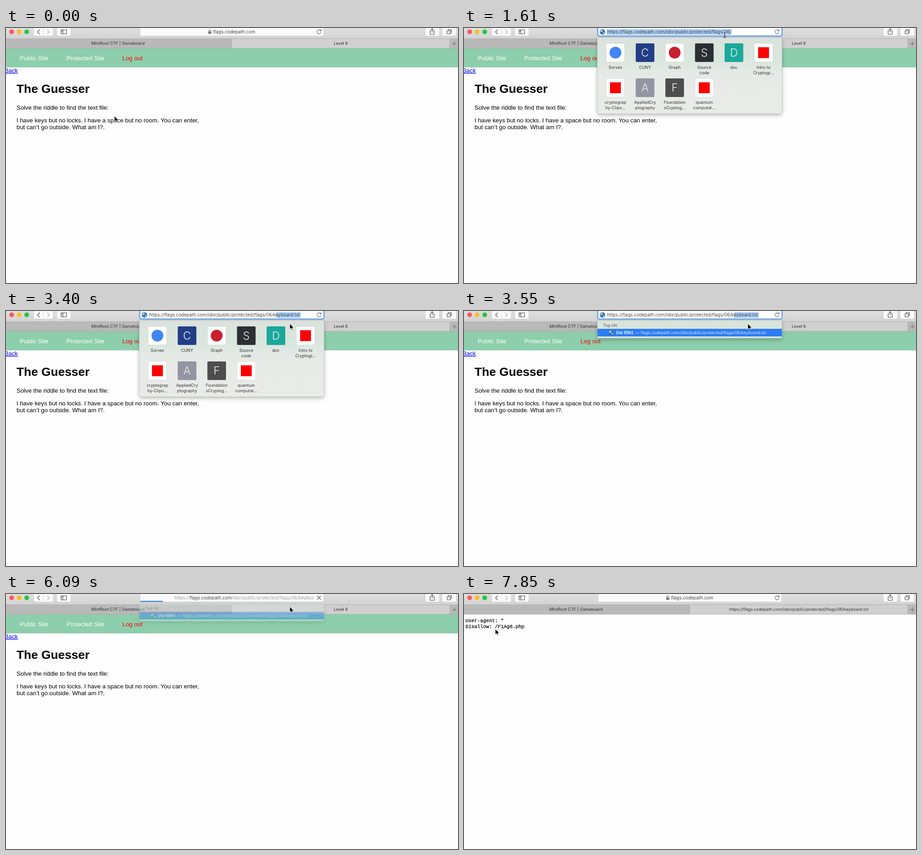
Write an HTML page that moves like this. It is 997 px wide and 562 px high and loops after 8000 ms.

```html
<!DOCTYPE html>
<html lang="en">
<head>
<meta charset="utf-8">
<title>Browser riddle</title>
<style>
  html, body { margin: 0; width: 100%; height: 100%; overflow: hidden; background: #fefefe; }
  svg { display: block; }
  text { white-space: pre; }
  .ui { font: 9.15px Inter, "Open Sans", sans-serif; fill: #333; }
  .mid { text-anchor: middle; }
  .url { font-size: 9.88px; fill: #444; }
  .page { font: 13.3px "Liberation Sans", Arial, sans-serif; }
  .mono { font: 10.83px "Liberation Mono", Courier, monospace; stroke: #000; stroke-width: .25; }
  .line { fill: none; stroke: #444; stroke-width: 1.1; }
  .btn { fill: #fbfbfb; stroke: #c6c6c6; stroke-width: .6; }
  .shadow { filter: drop-shadow(0 3px 4px #0004); }
</style>
</head>
<body>
<svg width="997" height="562" viewBox="0 0 997 562">
  <defs>
    <linearGradient id="bar" x2="0" y2="1"><stop stop-color="#dfdfdf"/><stop offset="1" stop-color="#d3d3d3"/></linearGradient>
    <linearGradient id="glass" x2="0" y2="1">
      <stop stop-color="#dce2dd"/><stop offset=".25" stop-color="#d8e6dd"/>
      <stop offset=".5" stop-color="#e6eae6"/><stop offset="1" stop-color="#eaebe9"/>
    </linearGradient>
    <clipPath id="field"><rect x="296" width="382" height="18"/></clipPath>
    <g id="globe">
      <circle r="6" fill="#2d73bd"/>
      <path d="M-4-3Q-1-6 1-4L0-1-3 1-5 0ZM1 1 4 0 4 3 2 5Z" fill="#b9d3c0"/>
    </g>
  </defs>
  <rect width="997" height="562" fill="#fefefe"/>

  <g id="riddle" class="page">
    <rect y="45" width="997" height="41" fill="#8dceac"/>
    <path d="M0 86.2H997" stroke="#7db599" stroke-width=".8"/>
    <g fill="#fff"><text x="30.5" y="70.7">Public Site</text><text x="133.3" y="70.7">Protected Site</text></g>
    <text x="256.8" y="70.7" fill="#f00">Log out</text>
    <text x="-3.3" y="98" fill="#00e" text-decoration="underline">Back</text>
    <text x="23.3" y="143.4" font-size="26.6" font-weight="700">The Guesser</text>
    <text x="23.3" y="179.6">Solve the riddle to find the text file:</text>
    <text x="23.3" y="207.8">I have keys but no locks. I have a space but no room. You can enter,</text>
    <text x="23.3" y="223">but can’t go outside. What am I?.</text>
  </g>
  <g id="answer" class="mono">
    <text x="3.3" y="62">User-agent: *</text>
    <text x="3.3" y="74.5">Disallow: /F1Ag6.php</text>
  </g>

  <!-- toolbar and tabs -->
  <rect width="997" height="24" fill="url(#bar)"/>
  <rect y="24" width="498" height="21" fill="#b9b9b9"/>
  <rect x="498" y="24" width="481" height="21" fill="#d0d0d0"/>
  <rect x="979" y="24" width="18" height="21" fill="#b9b9b9"/>
  <path d="M0 23.6H997M0 44.6H997M498 24V45M979 24V45" stroke="#a8a8a8" stroke-width=".8"/>
  <path d="M984 34.5H994M989 29.5V39.5" class="line" style="stroke:#666"/>
  <circle cx="12.5" cy="8.3" r="5.3" fill="#fc5b57"/>
  <circle cx="29" cy="8.3" r="5.3" fill="#fdbc2f"/>
  <circle cx="45.7" cy="8.3" r="5.3" fill="#28c840"/>
  <g class="btn">
    <rect x="61" y="-5" width="43" height="22.5" rx="3"/>
    <rect x="112" y="-5" width="31" height="22.5" rx="3"/>
    <rect x="925" y="-5" width="31" height="22.5" rx="3"/>
    <rect x="962" y="-5" width="31" height="22.5" rx="3"/>
    <path d="M82.5 0V17"/>
    <rect x="296" y="-5" width="404.5" height="22.5" rx="3"/>
  </g>
  <g class="line">
    <path d="M74.5 3.5 69.5 8.5 74.5 13.5"/>
    <path d="M91 3.5 96 8.5 91 13.5" stroke="#aaa"/>
    <path d="M121.500 4H133.500V13H121.500ZM125.500 4V13M122.500 6H124.500M122.500 8H124.500"/>
    <path d="M938 6H935.500V14H944.500V6H942M940 10V1.500M937.500 4 940 1.500 942.500 4"/>
    <path d="M975.500 6V3.500H982.500V10H980M973 6H980V13H973Z"/>
  </g>
  <text class="ui mid" x="247" y="37.4">MintRoot CTF | Gameboard</text>
  <text id="tab" class="ui mid" x="738.5" y="37.4"></text>
  <path id="close" d="M505 31 511 37M511 31 505 37" class="line" style="stroke:#777"/>

  <!-- address field -->
  <g id="focus">
    <rect x="295" y="-5" width="406.500" height="22.800" rx="3.500" fill="#fff" stroke="#69a3ec" stroke-width="2.600"/>
    <use href="#globe" x="305.500" y="8.500"/>
  </g>
  <rect id="progress" x="296" y="15.2" height="2" fill="#1e78f0"/>
  <rect id="selection" y="2.500" height="12.500" fill="#a9cff7"/>
  <g clip-path="url(#field)" class="ui">
    <text id="scheme" class="url" y="12.4" text-anchor="end">https://</text>
    <text id="address" class="url" y="12.4"><tspan>flags.codepath.com</tspan><tspan id="path"></tspan></text>
  </g>
  <path id="caret" d="M0 2.500V15" stroke="#111"/>
  <g id="lock">
    <rect x="446" y="7.500" width="6.800" height="5.200" rx=".8" fill="#777"/>
    <path d="M447.300 8V6.200a2.100 2.100 0 0 1 4.200 0V8" class="line" style="stroke:#777"/>
  </g>
  <path id="reload" d="M694.500 6.200A4.500 4.500 0 1 0 695 9M695 3V6.500H691.500" class="line" style="stroke:#666"/>
  <path id="stop" d="M686.500 4 694.500 12.500M694.500 4 686.500 12.500" class="line" style="stroke:#555"/>

  <g id="favorites" class="ui mid">
    <rect class="shadow" x="294" y="21" width="407.500" height="168" rx="4" fill="url(#glass)" stroke="#bbb" stroke-width=".6"/>
  </g>
  <g id="hit" class="ui">
    <rect class="shadow" x="294" y="21" width="407.500" height="39" rx="4" fill="#d9e5db" stroke="#a9bfb0" stroke-width=".6"/>
    <text x="307" y="35.300" fill="#555">Top Hit</text>
    <rect x="294.300" y="39.300" width="407" height="16.700" fill="#2b7cf4"/>
    <use href="#globe" x="324.500" y="47.600"/>
    <g fill="#fff">
      <text x="335" y="51.200" font-weight="600" font-size="9.5">(no title)</text>
      <text x="377.800" y="51.200" fill="#d8e7ff">—</text>
      <text x="389.800" y="51.200" fill="#d8e7ff">flags.codepath.com/idor/public/protected/flags/06/keyboard.txt</text>
    </g>
  </g>

  <path id="arrow" d="M0 0V12.300L2.900 9.700 4.800 14 6.800 13.200 5 9H8.800Z" stroke="#fff" stroke-width=".8"/>
  <g id="beam" fill="none">
    <path id="beamLine" d="M-3.500-6Q0-6 0-4 0-6 3.500-6M0-4V4.500M-3.500 6.500Q0 6.500 0 4.500 0 6.500 3.500 6.500M-2 2H2" stroke="#fff" stroke-width="2.400"/>
    <use href="#beamLine" style="stroke:#111;stroke-width:1.2"/>
    <path d="M-3.500-6Q0-6 0-4 0-6 3.500-6M0-4V4.500M-3.500 6.500Q0 6.500 0 4.500 0 6.500 3.500 6.500M-2 2H2" stroke="#111" stroke-width="1.200"/>
  </g>
</svg>
<script>
const LOOP = 8000, STEPS = 54;
const folder = '/idor/public/protected/flags/06/', file = 'keyboard.txt';
const $ = id => document.getElementById(id);
const show = (id, on) => { $(id).style.display = on ? '' : 'none'; };
const set = (id, attrs) => { for (const k in attrs) $(id).setAttribute(k, attrs[k]); };
const within = (n, from, to) => n >= from && n < to;

// [mark, colour, label lines]; a mark of one letter fills its tile
const tiles = [
  ['dot', '#4285f4', 'Sorvex'], ['C', '#213e87', 'CUNY'], ['dot', '#c8202f', 'Graph'],
  ['S', '#2b2e33', 'Source', 'code'], ['D', '#1aa99b', 'doc'], ['box', '#f00', 'Intro to', 'Cryptogr...'],
  ['box', '#f00', 'cryptograp', 'hy-Clipo...'], ['A', '#9395a2', 'AppliedCry', 'ptography'],
  ['F', '#4d4d4d', 'Foundation', 'sCryptog...'], ['box', '#f00', 'quantum', 'computat...']
];
$('favorites').innerHTML += tiles.map(([mark, color, ...lines], i) => {
  const x = 334 + i % 6 * 65.35, y = 54.3 + (i > 5) * 77.4;
  const letter = mark.length === 1;
  const art = letter ? `<text y="8.600" font-size="24" font-weight="300" fill="#eee">${mark}</text>`
    : mark === 'dot' ? `<circle r="13" fill="${color}"/>`
    : `<rect x="-12" y="-12" width="24" height="24" fill="${color}"/>`;
  const label = lines.map((s, j) => `<text y="${35.6 + j * 11.8}">${s}</text>`).join('');
  return `<g transform="translate(${x} ${y})"><rect x="-20.400" y="-20.400" width="40.800" height="40.800" rx="2"
    fill="${letter ? color : '#fff'}" stroke="#0002" stroke-width=".8"/>${art}${label}</g>`;
}).join('');

// pointer keys: [step, x, y]
const route = [[0, 239, 194], [8, 571, 14], [9, 575, 15], [11, 575, 15], [13, 626, 28], [42, 626, 28],
  [48, 130, 93], [49, 104, 95], [50, 70, 91], [51, 44, 83], [52, 53, 78], [53, 69, 77]];

function pointer(n) {
  const i = route.findIndex(k => k[0] >= n);
  if (i < 1) return route[0].slice(1);
  const [a, ax, ay] = route[i - 1], [b, bx, by] = route[i];
  const u = (n - a) / (b - a), e = u * u * (3 - 2 * u);
  return [ax + (bx - ax) * e, ay + (by - ay) * e];
}

// [left, right] of the selected part of the address
function selected(n) {
  if (within(n, 11, 16)) return [315, 590];
  if (within(n, 23, 35)) return [n < 25 ? 595.5 : n < 27 ? 601 : 606, 650];
}

// x of the host name and opacity of the rest of the address
function slide(n) {
  if (n < 10 || n >= 45) return [457, 0];
  if (n === 10) return [400, .4];
  if (n < 41) return [349.3, 1];
  return n === 41 ? [405, .5] : [442, n === 42 ? .12 : 0];
}

function draw(n) {
  const loaded = n >= 42, loading = within(n, 41, 45), focused = within(n, 10, 41);
  show('riddle', !loaded);
  show('answer', loaded);
  $('tab').textContent = loaded ? 'https://flags.codepath.com' + folder + file : 'Level 6';
  show('close', within(n, 42, 44));
  show('focus', focused);
  show('lock', n < 10 || n >= 45);
  show('stop', loading);
  show('reload', !loading);
  show('progress', loading);
  set('progress', { width: [50, 153, 290, 404][n - 41] || 0 });

  const [x, rest] = slide(n);
  set('scheme', { x, opacity: rest });
  set('address', { x });
  set('path', { 'fill-opacity': rest });
  $('path').textContent = folder + (n >= 23 ? file : '');

  const part = selected(n);
  show('selection', part);
  if (part) set('selection', { x: part[0], width: part[1] - part[0] });
  show('caret', within(n, 16, 20) || within(n, 35, 39));
  set('caret', { transform: `translate(${n < 23 ? 590.7 : 649.7} 0)` });

  show('favorites', within(n, 10, 24));
  set('favorites', { opacity: n === 10 ? .5 : 1 });
  show('hit', within(n, 24, 42));
  set('hit', { opacity: n === 41 ? .4 : 1 });

  const beam = within(n, 9, 12), transform = `translate(${pointer(n)})`;
  show('beam', beam);
  show('arrow', !beam);
  set('beam', { transform });
  set('arrow', { transform });
}

const start = performance.now();
function tick() {
  const t = (performance.now() - start) % LOOP;
  draw(Math.min(STEPS - 1, Math.floor(t * STEPS / LOOP + .13)));
  requestAnimationFrame(tick);
}
tick();
</script>
</body>
</html>
```
